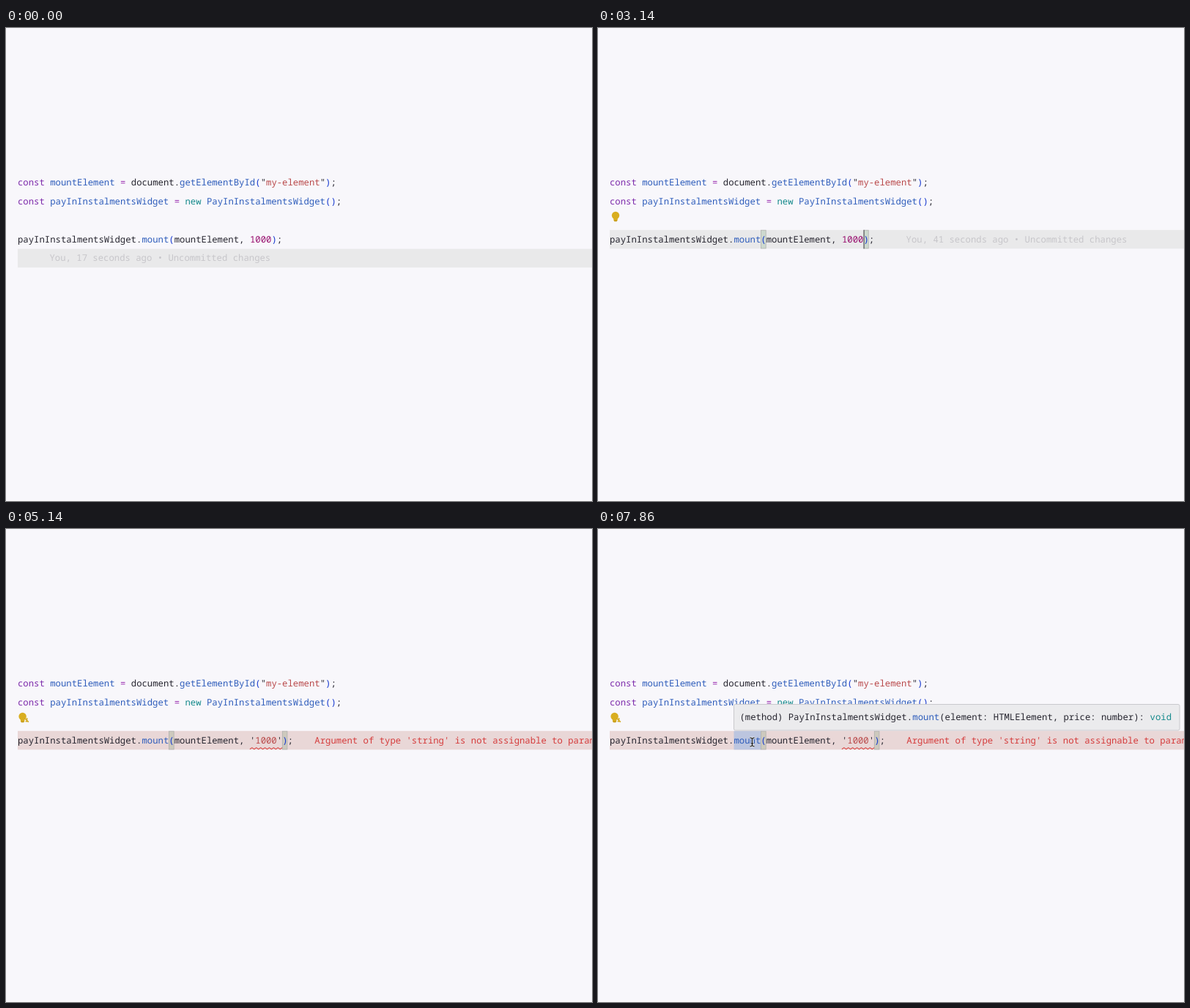
These frames come from a looping animation (800x646 px, 8 s). An HTML page:

```html
<!DOCTYPE html>
<html lang="en">
<head>
<meta charset="utf-8">
<title>Editor type check</title>
<style>
  html, body { margin: 0; width: 100%; height: 100%; overflow: hidden; background: #f8f7fb; }
  svg { display: block; width: 100vw; height: 100vh; }
  text {
    font: 12.28px "Noto Sans Mono", "DejaVu Sans Mono", monospace;
    font-variant-ligatures: none;
    text-rendering: geometricPrecision;
    white-space: pre;
  }
</style>
</head>
<body>
<svg id="stage" viewBox="0 0 800 646" xmlns="http://www.w3.org/2000/svg"></svg>
<script>
const stage = document.getElementById("stage");
const LOOP = 8000, STEPS_PER_SECOND = 7;
const LEFT = 16, CHAR = 7.37, TOP = 198.4, ROW = 25.8;
const C = {
  text: "#26252f", keyword: "#7d2bab", operator: "#9a2fb0", name: "#2d5cbb", paren: "#1538cf",
  string: "#b9494a", create: "#158a8c", number: "#98106f", faint: "#c7c6ca", error: "#d53c3c"
};

// Steps at which the editor changes.
const ENTER = 2, CLICK = 10, BLAME = 13, LEAVE = 19, CARET_LEFT = 20, BULB = 21,
  QUOTE = 24, SYNTAX_ERROR = 25, WALK = 27, CLOSED = 33, TYPE_ERROR = 36, RETURN = 38, HOVER = 55;

const colX = col => LEFT + col * CHAR;
const rowY = row => TOP + row * ROW;
const rect = (x, y, w, h, fill, extra = "") =>
  `<rect x="${x}" y="${y}" width="${w}" height="${h}" fill="${fill}" ${extra}/>`;
const band = (row, fill) => rect(LEFT, rowY(row), 800 - LEFT, ROW - 0.2, fill);

// Tokens are [colour, text] pairs laid out on the character grid.
function tokens(x, y, pairs) {
  let col = 0;
  return pairs.map(([color, str]) => {
    const out = `<text x="${x + col * CHAR}" y="${y}" fill="${C[color]}">${str}</text>`;
    col += str.length;
    return out;
  }).join("");
}
const line = (row, col, pairs) => tokens(colX(col), rowY(row) + 16.7, pairs);

const bracket = col => rect(colX(col) + 0.2, rowY(3) + 0.4, 6.6, ROW - 1,
  "rgba(0,100,0,.12)", 'stroke="#afb0ae" stroke-width=".8"');

function squiggle(row, from, to) {
  const y = rowY(row) + 24, end = colX(to);
  let x = colX(from), up = true, d = `M${x} ${y + 1}`;
  while (x < end - 1) {
    x += 2.95;
    d += `L${Math.min(x, end)} ${y + (up ? -1.2 : 1)}`;
    up = !up;
  }
  return `<path d="${d}" fill="none" stroke="#d84a48" stroke-width="1.1" stroke-linejoin="round"/>`;
}

function bulb(fixable) {
  const x = fixable ? 22.6 : 24;
  const wrench = '<path d="M25.5 258.5L30.8 263.6M28.6 258v4M26.6 262.8h2.6" stroke="#d3a91e" stroke-width="1.5"/>';
  return `<g fill="#d9ae20"><circle cx="${x}" cy="256" r="5.2"/>` +
    rect(x - 2.7, 259, 5.4, 4.4, "#d9ae20", 'rx=".8"') +
    rect(x - 2, 262.6, 4, 1.6, "#c49a1c", 'rx=".6"') + (fixable ? wrench : "") + "</g>";
}

function pointer([x, y]) {
  const d = `M${x - 3} ${y - 5.8}q2.4 0 3 1.4q.6-1.4 3-1.4M${x} ${y - 4.4}v8.8` +
    `M${x - 3} ${y + 5.8}q2.4 0 3-1.4q.6 1.4 3 1.4M${x - 1.6} ${y + 2}h3.2`;
  return `<g fill="none"><path d="${d}" stroke="#fff" stroke-opacity=".8" stroke-width="2.8"/>` +
    `<path d="${d}" stroke="#161616" stroke-width="1.2"/></g>`;
}

// Points are [step, x, y]; motion eases between them.
function along(points, step) {
  const last = points[points.length - 1];
  if (step >= last[0]) return last.slice(1);
  const i = points.findIndex(p => p[0] > step);
  const [s0, x0, y0] = points[i - 1], [s1, x1, y1] = points[i];
  const p = (step - s0) / (s1 - s0), e = p * p * (3 - 2 * p);
  return [x0 + (x1 - x0) * e, y0 + (y1 - y0) * e];
}
const ARRIVAL = [[ENTER, 452, 533], [9, 437.5, 292]];
const DEPARTURE = [[RETURN, 438, 293], [41, 472.5, 310], [44, 466, 323], [48, 330, 306], [53, 210.5, 291]];

function pointerAt(step) {
  if (step >= ENTER && step < LEAVE) return pointer(along(ARRIVAL, step));
  return step >= RETURN ? pointer(along(DEPARTURE, step)) : "";
}

function caretAt(step) {
  if (step < ENTER) return "";
  const typing = step >= CARET_LEFT && step < TYPE_ERROR;
  const anchor = step < CLICK ? ENTER : step < CARET_LEFT ? CLICK : TYPE_ERROR + 0.4;
  if (!typing && (step - anchor + STEPS_PER_SECOND) % STEPS_PER_SECOND >= 3.5) return "";
  let col = 44;
  if (step < CLICK) col = 0;
  else if (step < CARET_LEFT) col = 49;
  else if (step < BULB) col = 48;
  else if (step < QUOTE) col = 47;
  else if (step < WALK) col = 48;
  else if (step < CLOSED) col = Math.max(43, 47 - (step - WALK));
  return rect(colX(col) + 0.3, rowY(step < CLICK ? 4 : 3), 1, ROW - 0.2, "#55555c");
}

function callArgument(step) {
  if (step < QUOTE) return [["number", "1000"], ["paren", ")"], ["text", ";"]];
  if (step < CLOSED) return [["number", "1000"], ["text", "'"], ["string", ");"]];
  return [["text", "'"], ["string", "1000"], ["text", "'"], ["paren", ")"], ["text", ";"]];
}

function blame(step) {
  const message = seconds => [["faint", `You, ${seconds} seconds ago • Uncommitted changes`]];
  if (step < CLICK) return line(4, 5.9, message(17));
  return step >= BLAME && step < QUOTE ? line(3, 54.9, message(41)) : "";
}

function errors(step) {
  if (step < SYNTAX_ERROR) return "";
  if (step >= TYPE_ERROR)
    return squiggle(3, 43, 49) +
      line(3, 55, [["error", "Argument of type 'string' is not assignable to parameter"]]);
  const shift = step >= CLOSED ? 1 : 0;
  return squiggle(3, 47 + shift, 50 + shift) + squiggle(4, 0, 1) +
    line(3, 54 + shift, [["error", "',' expected."]]) + line(4, 4, [["error", "')' expected."]]);
}

const tooltip = rect(185.5, 239.5, 608.5, 35.5, "#ebebed", 'rx="2" stroke="#c9c9cd"') +
  tokens(193.5, 260.7, [
    ["text", "(method) PayInInstalmentsWidget."], ["name", "mount"],
    ["text", "(element: HTMLElement, price: number): "], ["create", "void"]
  ]);

function draw(step) {
  const broken = step >= SYNTAX_ERROR;
  const unclosed = step >= QUOTE && step < CLOSED;
  const matched = step >= CARET_LEFT && !unclosed;
  let out = rect(0, 0, 800, 646, "#f8f7fb") + rect(0, 645, 800, 1, "#fdfdfe");

  out += band(step < CLICK ? 4 : 3, broken ? "#e9d7d7" : "#e9e9ea");
  if (broken && step < TYPE_ERROR) out += band(4, "#f4e1e1");
  if (step >= HOVER) out += rect(colX(23), rowY(3), 5 * CHAR, ROW - 0.2, "#bcc5df");
  if (matched) out += bracket(28) + bracket(step < CLOSED ? 47 : 49);

  out += line(0, 0, [
    ["keyword", "const "], ["name", "mountElement "], ["operator", "= "], ["text", "document."],
    ["name", "getElementById"], ["paren", "("], ["text", '"'], ["string", "my-element"],
    ["text", '"'], ["paren", ")"], ["text", ";"]
  ]);
  out += line(1, 0, [
    ["keyword", "const "], ["name", "payInInstalmentsWidget "], ["operator", "= "],
    ["create", "new "], ["name", "PayInInstalmentsWidget"], ["paren", "()"], ["text", ";"]
  ]);
  out += line(3, 0, [
    ["text", "payInInstalmentsWidget."], ["name", "mount"], [unclosed ? "error" : "paren", "("],
    ["text", "mountElement, "], ...callArgument(step)
  ]);

  out += blame(step) + errors(step) + caretAt(step);
  if (step >= BULB) out += bulb(broken);
  if (step >= HOVER) out += tooltip;
  stage.innerHTML = out + pointerAt(step);
}

let shown = -1;
function tick() {
  const time = performance.now() % LOOP;
  const step = Math.floor((time + 5) * STEPS_PER_SECOND / 1000) % 56;
  if (step !== shown) draw(shown = step);
  requestAnimationFrame(tick);
}
tick();
</script>
</body>
</html>
```
